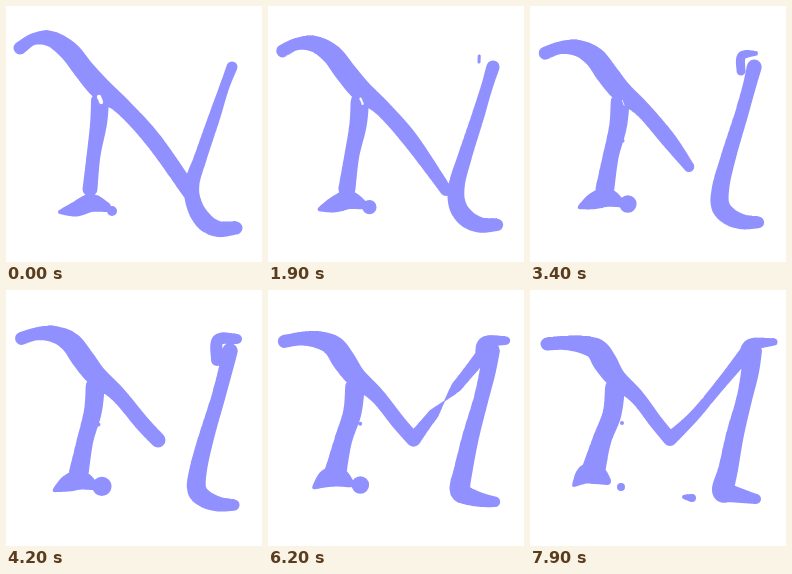
An HTML page with a canvas that plays this animation: 256 by 256 pixels, repeating every 8 s.

```html
<!DOCTYPE html>
<html lang="en">
<head>
<meta charset="utf-8">
<title>Letter morph</title>
<style>
html, body { margin: 0; width: 100%; height: 100%; overflow: hidden; background: #fff; }
canvas { display: block; width: 100vw; height: 100vh; }
</style>
</head>
<body>
<canvas id="stage" width="256" height="256"></canvas>
<script>
const LOOP = 8000, STEP = 100, END = LOOP - STEP;
const INK = '#9090ff', PAPER = '#fff';
const ctx = document.getElementById('stage').getContext('2d');

const clamp = v => Math.min(1, Math.max(0, v));
const ramp = (t, from, to) => clamp((t - from) / (to - from));
const mix = (a, b, u) => a.map((v, i) => v + (b[i] - v) * u);

// A brush point is [x, y, radius]. It is absent before its first key.
const track = (...keys) => t => {
  if (t < keys[0][0]) return null;
  const next = keys.findIndex(([time]) => time > t);
  if (next < 0) return keys[keys.length - 1][1];
  const [t0, a] = keys[next - 1], [t1, b] = keys[next];
  return mix(a, b, ramp(t, t0, t1));
};
const glide = (a, b) => track([0, a], [END, b]);
const still = p => () => p;

const valley = track(
  [0, [184, 186, 8]], [1900, [178, 184, 6]], [2700, [165, 170, 3.5]],
  [4200, [152, 150, 7.5]], [END, [140, 149, 7]]
);

const archAndDiagonal = [
  glide([14, 42, 6.5], [17, 54, 6.5]),
  glide([28, 33, 6], [35, 53, 7]),
  glide([45, 33, 8], [54, 55, 9]),
  glide([63, 45, 10], [67, 60, 11]),
  glide([79, 65, 10.5], [75, 72, 12]),
  glide([95, 83, 11], [86, 88, 10]),
  glide([118, 102, 8.5], [107, 107, 7.5]),
  glide([148, 135, 8.5], [126, 132, 7]),
  valley
];

const leftStem = [
  glide([94, 95, 9], [85, 98, 10]),
  glide([92.5, 118, 8.5], [82, 124, 9.5]),
  glide([87.5, 150, 7], [72, 150, 9.5]),
  glide([84, 183, 7.5], [63, 182, 12])
];

const leftFoot = [
  glide([54, 206, 2], [44, 195, 2]),
  glide([70, 203, 7.5], [56, 184, 9.5]),
  glide([85, 197, 9], [66, 184, 10]),
  glide([100, 201, 5], [77, 191, 4])
];
const footChip = [track([0, [106, 205, 5]], [5400, [93, 194, 11]], [END, [91, 197, 4]])];

const rightStem = [
  glide([226, 61, 5.5], [222, 61, 10]),
  glide([218, 82, 5], [220, 82, 9]),
  glide([208, 112, 6], [214, 110, 8]),
  glide([195, 150, 6.5], [205, 145, 9]),
  glide([186, 178, 7.5], [198, 180, 10]),
  glide([188, 198, 8], [193, 200, 11]),
  glide([198, 215, 9], [199, 203, 9]),
  glide([212, 223, 8], [212, 206, 7]),
  glide([230, 222, 6.5], [226, 209, 5])
];

// Grows from a drop, then spreads to the right.
const serif = [
  track([1100, [211, 51, 0]], [4200, [211, 70, 6]], [END, [215, 66, 6]]),
  track([1100, [211, 50, 0]], [4200, [212, 50, 6]], [END, [221, 55, 6.5]]),
  track([2700, [221, 46, 0]], [4200, [231, 49, 5]], [END, [244, 52, 3.5]])
];

const arm = [valley, still([164, 126, 5.5]), still([190, 95, 5.5]), still([216, 63, 7])];

const crumbs = [
  [glide([93, 136, 2], [92, 133, 2])],
  [track([4600, [101, 143, 0]], [5400, [101, 143, 2.5]], [6100, [101, 143, 0]])],
  [
    track([6300, [153, 211, 0]], [END, [154, 207, 2]]),
    track([6300, [158, 211, 0]], [END, [162, 208, 4]])
  ]
];

const hole = [
  track([0, [93, 91, 2.2]], [4200, [92, 95, 0]]),
  track([0, [95, 96, 2.2]], [4200, [94, 100, 0]])
];

// The arm fills in from both ends until they meet.
const armWeight = t => {
  const reach = 1.3 * ramp(t, 4200, 6700);
  return u => clamp(3 * (reach - 2 * Math.min(u, 1 - u)));
};

function spline(a, b, c, d, u) {
  return b.map((v, i) => {
    const k1 = c[i] - a[i];
    const k2 = 2 * a[i] - 5 * v + 4 * c[i] - d[i];
    const k3 = 3 * (v - c[i]) + d[i] - a[i];
    return v + (k1 * u + k2 * u * u + k3 * u * u * u) / 2;
  });
}

function disc([x, y, r], scale = 1) {
  const size = r * scale;
  if (size <= 0) return;
  ctx.moveTo(x + size, y);
  ctx.arc(x, y, size, 0, 2 * Math.PI);
}

// Sweeps a round brush of changing size along a smooth line.
function sweep(stroke, t, weight = () => 1) {
  const points = stroke.map(p => p(t)).filter(Boolean);
  const last = points.length - 1;
  const at = i => points[Math.min(last, Math.max(0, i))];
  if (last === 0) disc(points[0]);
  for (let i = 0; i < last; i++) {
    for (let u = 0; u <= 1; u += 1 / 32) {
      disc(spline(at(i - 1), at(i), at(i + 1), at(i + 2), u), weight((i + u) / last));
    }
  }
}

function paint(color, build) {
  ctx.beginPath();
  build();
  ctx.fillStyle = color;
  ctx.fill();
}

function draw(t) {
  paint(PAPER, () => ctx.rect(0, 0, 256, 256));
  paint(INK, () => {
    for (const stroke of [archAndDiagonal, leftStem, leftFoot, footChip, rightStem, serif, ...crumbs]) {
      sweep(stroke, t);
    }
    sweep(arm, t, armWeight(t));
  });
  paint(PAPER, () => sweep(hole, t));
}

const start = performance.now();
function tick() {
  const t = (performance.now() - start) % LOOP;
  draw(Math.floor(t / STEP) * STEP);
  requestAnimationFrame(tick);
}
tick();
</script>
</body>
</html>
```
